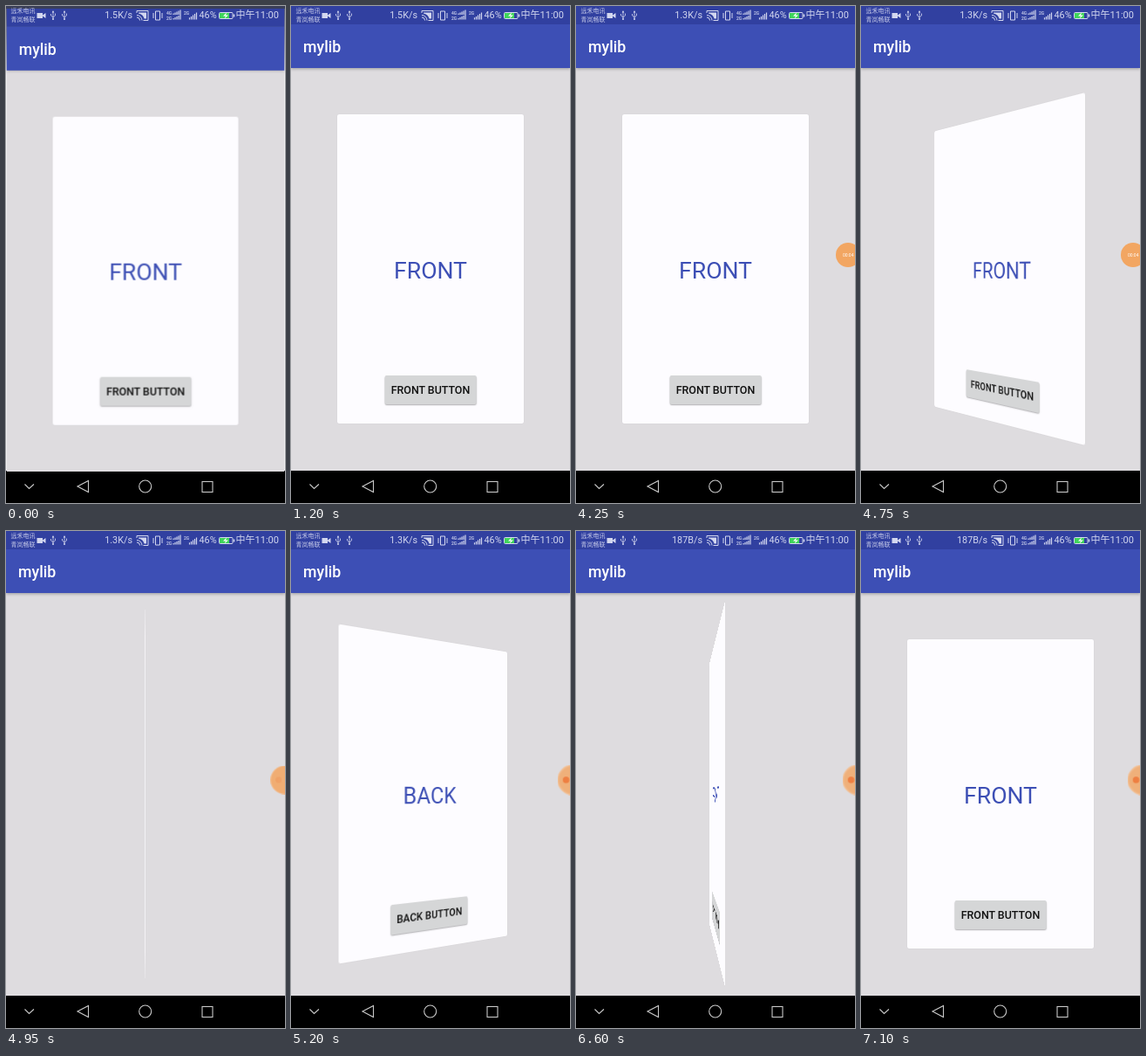
An HTML page that plays this animation: 320 by 569 pixels, repeating every 8000 ms.

```html
<!DOCTYPE html>
<html lang="en">
<head>
<meta charset="utf-8">
<title>Card flip</title>
<style>
  :root { --loop: 8s; --blue: #3d4fb5; --dark: #3140a0; }
  html, body { margin: 0; width: 100%; height: 100%; overflow: hidden; background: #000; }
  body { font-family: Roboto, "Noto Sans CJK SC", "Noto Sans CJK", sans-serif; }
  .stage { position: relative; width: 320px; height: 569px; overflow: hidden; background: #000; }
  .stage div, .stage svg { position: absolute; white-space: nowrap; }

  .desk { left: 0; top: 0; width: 320px; height: 532px;
    background: linear-gradient(#3a3f58 4px, #f4f4f6 80px); }
  .app { left: 0; top: 0; width: 320px; height: 532px; background: #dedcdf;
    transform-origin: 50% 0; animation: settle var(--loop) linear infinite; }
  .status { left: 0; top: 0; width: 320px; height: 21px; background: var(--dark); }
  .bar { left: 0; top: 21px; width: 320px; height: 50px; background: var(--blue);
    box-shadow: 0 1.5px 3px rgba(0, 0, 0, .25); }
  .title { left: 14px; top: 16px; line-height: 20px; font-size: 17.8px; font-weight: 500; color: #fff; }

  .scene { left: 53px; top: 124px; width: 214px; height: 354px; perspective: 526px; }
  .card { inset: 0; transform-style: preserve-3d; animation: flip var(--loop) linear infinite; }
  .face { inset: 0; border-radius: 2px; background: #fdfcff; backface-visibility: hidden;
    box-shadow: 0 0 1px rgba(0, 0, 0, .12); }
  .back { transform: rotateY(180deg); }
  .word { left: 0; right: 0; top: 163px; line-height: 32px; text-align: center;
    font-size: 26.67px; color: var(--blue); }
  .button { left: 50%; top: 299px; height: 33px; padding: 0 7px; line-height: 33px;
    transform: translateX(-50%); border-radius: 2px; background: #d5d6d7; color: #111;
    font-size: 12.44px; font-weight: 500; box-shadow: 0 1px 1.5px rgba(0, 0, 0, .3); }

  .info { top: 4px; height: 14px; line-height: 14px; font-size: 10.8px; color: #d3d7ef; }
  .carrier { left: 5.5px; top: 1px; line-height: 10px; font-size: 7px; color: #c9cdea; }
  .roll { overflow: hidden; }
  .roll span { display: block; height: 100%; animation: var(--loop) step-end infinite; }
  .speed { right: 175px; width: 50px; text-align: right; }
  .speed span { animation-name: speed; }

  .bubble { left: 298px; top: 271px; width: 28px; height: 28px; border-radius: 50%;
    background: #f2a662; animation: bubble var(--loop) ease-out infinite; }
  .timer { left: 8px; top: 10px; width: 14px; height: 8px; line-height: 8px; font-size: 5px; color: #fff;
    animation: label var(--loop) linear infinite; }
  .timer span { animation-name: timer; }
  .dot { left: 4.6px; top: 11px; width: 6px; height: 6px; border-radius: 50%; background: #ee7f42;
    animation: dot var(--loop) linear infinite; }

  @keyframes settle {
    0%, .6% { transform: translateY(3px) scale(.995, .997); }
    1.875%, 100% { transform: none; }
  }
  @keyframes flip {
    0%, 55.625% { transform: rotateY(0); animation-timing-function: cubic-bezier(.364, 0, .636, 1); }
    68.125% { transform: rotateY(-180deg); }
    76.05% { transform: rotateY(-180deg); animation-timing-function: cubic-bezier(.364, 0, .636, 1); }
    88.55%, 100% { transform: rotateY(0); }
  }
  @keyframes speed {
    0% { transform: none; }
    32.4% { transform: translateY(-100%); }
    69.9%, 100% { transform: translateY(-200%); }
  }
  @keyframes timer {
    0% { transform: none; }
    26.8% { transform: translateY(-100%); }
    39.3% { transform: translateY(-200%); }
    53%, 100% { transform: translateY(-300%); }
  }
  @keyframes bubble {
    0%, 24.375% { transform: translateX(24px); background: #f2a662; }
    28.125%, 60.6% { transform: none; background: #f2a662; box-shadow: none; }
    63.1%, 100% { transform: translateX(11px) scale(1.25); background: #efb07a;
      box-shadow: inset 0 0 1.5px 1px rgba(255, 255, 255, .25); }
  }
  @keyframes label { 0%, 60.6% { opacity: 1; } 62%, 100% { opacity: 0; } }
  @keyframes dot { 0%, 61.5% { opacity: 0; } 63.1%, 100% { opacity: 1; } }
</style>
</head>
<body>
<div class="stage">
  <div class="desk"></div>
  <div class="app">
    <div class="status"></div>
    <div class="bar"><div class="title">mylib</div></div>
    <div class="scene">
      <div class="card">
        <div class="face">
          <div class="word">FRONT</div>
          <div class="button">FRONT BUTTON</div>
        </div>
        <div class="face back">
          <div class="word">BACK</div>
          <div class="button">BACK BUTTON</div>
        </div>
      </div>
    </div>
  </div>

  <div class="carrier">远禾电讯<br>青岚畅联</div>
  <div class="info roll speed"><span>1.5K/s</span><span>1.3K/s</span><span>187B/s</span></div>
  <div class="info" style="left:221.5px">46%</div>
  <div class="info" style="right:7px;font-size:11px">中午11:00</div>

  <svg width="320" height="22" style="left:0;top:0" fill="none" stroke="#d3d7ef">
    <defs>
      <g id="usb" stroke-width=".8">
        <path d="M0 6V15M-2.5 9V11L0 13L2.5 11V8.5"/>
        <path d="M-1.3 7.5L0 5L1.3 7.5Z" fill="#d3d7ef" stroke="none"/>
        <circle cy="15" r="1" fill="#d3d7ef" stroke="none"/>
      </g>
      <path id="bars" d="M0 0V-1.5M2 0V-2.5M4 0V-3.5M6 0V-4.5M8 0V-5.5" stroke-width="1.2"/>
    </defs>
    <path d="M35.5 8H42V14H35.5ZM42 10.5L45.5 8V14L42 11.5Z" fill="#d3d7ef" stroke="none"/>
    <use href="#usb" x="54"/>
    <use href="#usb" x="67"/>
    <path d="M150 8V5.5H163V16.5H157.5M150 10.5A6 6 0 0 1 156 16.5M150 13A3.5 3.5 0 0 1 153.5 16.5"/>
    <path d="M152 7.500H161V14.500H158.500A8 8 0 0 0 152 8.500Z" fill="#d3d7ef" stroke="none"/>
    <path d="M171.5 6H176.5V16H171.5ZM169 8V14M179 8V14"/>
    <use href="#bars" x="192" y="10"/>
    <use href="#bars" x="192" y="15.5"/>
    <use href="#bars" transform="translate(210.5 15.5) scale(1 1.45)"/>
    <g fill="#d3d7ef" stroke="none" font-size="5" font-weight="500">
      <text x="184" y="10">4G</text>
      <text x="184" y="15.5">2G</text>
      <text x="204" y="10">2G</text>
    </g>
    <rect x="244.5" y="7.5" width="15.5" height="7" rx="1"/>
    <path d="M261.5 9.5V12.5" stroke-width="1.5"/>
    <path d="M245 8H256V14H245Z" fill="#3fd45b" stroke="none"/>
    <path d="M253 7.5L249 11.5H252L250.5 14.5L255 10.5H252Z" fill="#fff" stroke="none"/>
  </svg>

  <svg width="320" height="38" style="left:0;top:531px" fill="none" stroke="#c8c8c8" stroke-width="1.1">
    <path d="M21.5 16.5L26.5 21.5L32 16.5M82 19L94.5 12.5V25.5Z"/>
    <circle cx="159.7" cy="19" r="7"/>
    <rect x="225" y="13.5" width="12" height="12"/>
  </svg>

  <div class="bubble">
    <div class="roll timer"><span>00:01</span><span>00:02</span><span>00:03</span><span>00:04</span></div>
    <div class="dot"></div>
  </div>
</div>
</body>
</html>
```
